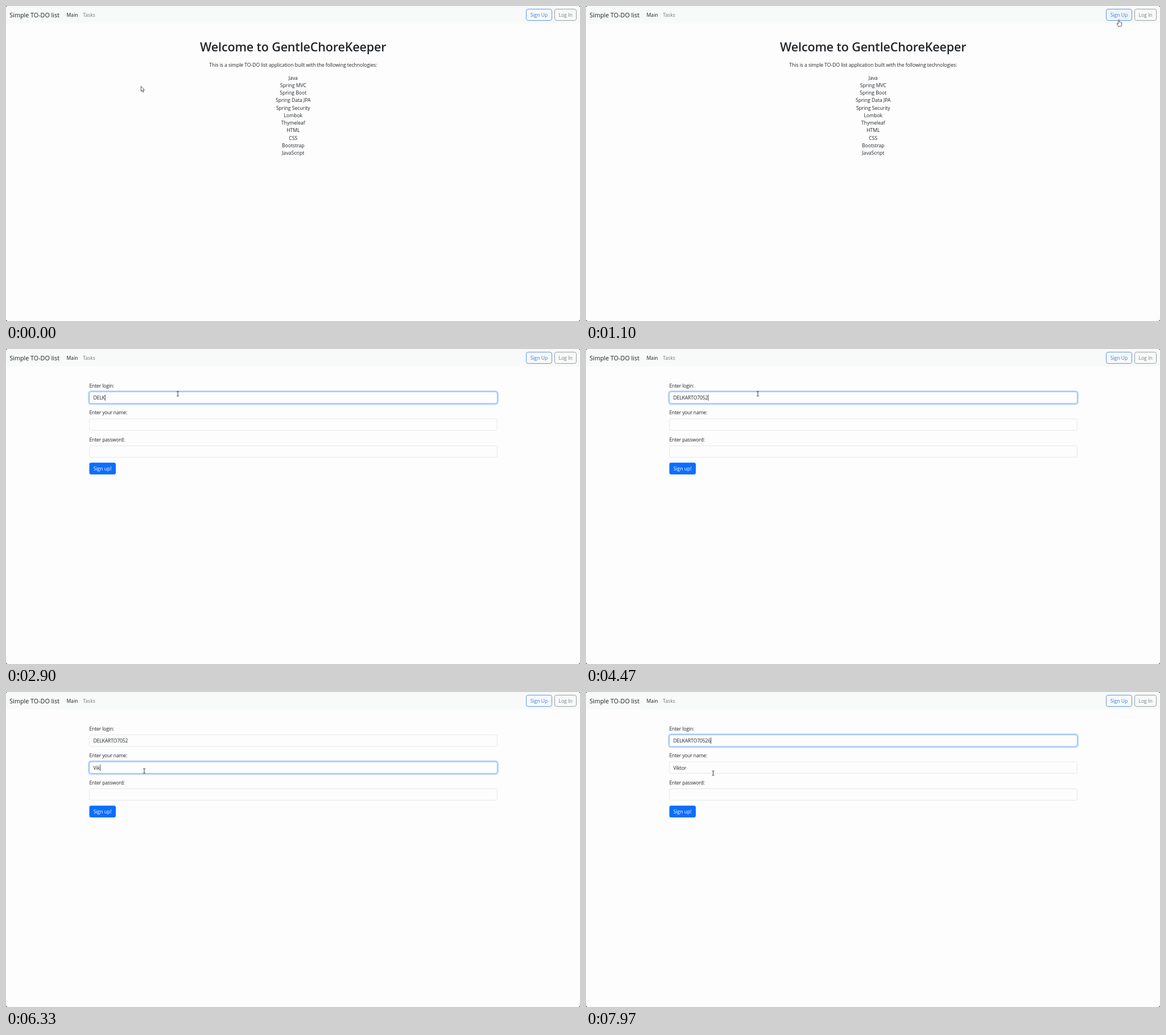
Animation, 1009 px wide and 555 px high, one loop 8000 ms. Source, as an HTML page:

```html
<!DOCTYPE html>
<html lang="en">
<head>
<meta charset="utf-8">
<title>Simple TO-DO list</title>
<style>
  html, body { margin: 0; width: 100%; height: 100%; overflow: hidden; background: #2b2b2b; }
  svg { display: block; width: 1009px; height: 555px; }
  text { font: 8.6px "Open Sans", "Noto Sans", sans-serif; fill: #212529; white-space: pre; }
  .brand { font-size: 10.75px; fill: #1a1d20; }
  .title { font-size: 21.5px; font-weight: 600; letter-spacing: -.15px; }
  .intro { letter-spacing: -.05px; }
  .label { letter-spacing: -.17px; }
  .value { letter-spacing: -.12px; }
  .mid { text-anchor: middle; }
</style>
</head>
<body>
<svg id="stage" viewBox="0 0 1009 555" xmlns="http://www.w3.org/2000/svg"></svg>
<script>
const LOOP = 8000, FADE = 150, BLINK = 530;
const PAGE_SWITCH = 1500, HOVER = 1085;
const SIGN_UP = { x: 914.5, y: 5.5, w: 45, h: 20 };
const LOG_IN = { x: 964.5, y: 5.5, w: 38, h: 20 };
const FIELD = { x: 146.5, w: 717, h: 20.4 };

const stage = document.getElementById('stage');

function add(parent, tag, attrs = {}, content) {
  const el = document.createElementNS('http://www.w3.org/2000/svg', tag);
  for (const key in attrs) el.setAttribute(key, attrs[key]);
  if (content !== undefined) el.textContent = content;
  parent.append(el);
  return el;
}
const label = (parent, x, y, str, cls = '', fill) =>
  add(parent, 'text', { x, y, class: cls, ...(fill && { style: `fill:${fill}` }) }, str);
const box = (parent, { x, y, w, h }, attrs) =>
  add(parent, 'rect', { x, y, width: w, height: h, rx: 3.3, ...attrs });

// Window and navigation bar
add(stage, 'rect', { width: 1009, height: 555, rx: 3.5, fill: '#fdfdfd' });
add(stage, 'path', { d: 'M0 31V3.5Q0 0 3.5 0H1005.5Q1009 0 1009 3.5V31Z', fill: '#f8f9f9' });
label(stage, 6.3, 20, 'Simple TO-DO list', 'brand');
label(stage, 106.6, 19, 'Main', '', '#16191c');
label(stage, 135.2, 19, 'Tasks', '', '#74777a');
box(stage, SIGN_UP, { fill: 'none', stroke: '#5a97ea' });
label(stage, 937, 19, 'Sign Up', 'mid', '#2f7cf2');
box(stage, LOG_IN, { fill: 'none', stroke: '#9a9f9f' });
label(stage, 983.6, 19, 'Log In', 'mid', '#767e85');

const hover = add(stage, 'g');
box(hover, SIGN_UP, { fill: '#0d6efd', stroke: '#0d6efd' });
label(hover, 937, 19, 'Sign Up', 'mid', '#fff');

// Welcome page
const welcome = add(stage, 'g');
label(welcome, 504.7, 80, 'Welcome to GentleChoreKeeper', 'title mid');
label(welcome, 504.8, 107.4, 'This is a simple TO-DO list application built with the following technologies:', 'intro mid');
['Java', 'Spring MVC', 'Spring Boot', 'Spring Data JPA', 'Spring Security', 'Lombok',
 'Thymeleaf', 'HTML', 'CSS', 'Bootstrap', 'JavaScript']
  .forEach((name, i) => label(welcome, 504.8, 129.6 + i * 13.27, name, 'mid'));

// Sign-up form
const form = add(stage, 'g');

function makeField(top, caption) {
  const area = { ...FIELD, y: top };
  label(form, 146.5, top - 7.7, caption, 'label');
  box(form, area, { fill: '#fdfdfd', stroke: '#dfe3e8', 'stroke-width': .8 });
  const focus = add(form, 'g', { opacity: 0 });
  box(focus, { x: area.x - 1.4, y: top - 1.4, w: area.w + 2.8, h: area.h + 2.8 },
    { rx: 4.5, fill: 'none', stroke: '#0d6efd', 'stroke-opacity': .27, 'stroke-width': 2.2 });
  box(focus, area, { fill: 'none', stroke: '#86b7fe', 'stroke-width': .9 });
  const text = label(form, 153.4, top + 13.8, '', 'value');
  const caret = add(form, 'rect', { y: top + 4.8, width: .8, height: 11, fill: '#212529' });
  return { top, focus, text, caret };
}

const login = makeField(75.5, 'Enter login:');
const person = makeField(123, 'Enter your name:');
const password = makeField(170.5, 'Enter password:');
const fields = [login, person, password];

Object.assign(login, {
  value: 'DELKARTO70526',
  keys: [2600, 2700, 2800, 2900, 3230, 3370, 3530, 3630, 3830, 4000, 4270, 4470, 7730],
  spans: [[2000, 5140], [7270, LOOP + FADE]]
});
Object.assign(person, {
  value: 'Viktor',
  keys: [6000, 6130, 6330, 6400, 6530, 6630],
  spans: [[5140, 7270]]
});
Object.assign(password, { value: '', keys: [], spans: [] });

box(form, { x: 146.5, y: 200.2, w: 46.5, h: 20.8 }, { fill: '#0d6efd' });
label(form, 169.7, 214, 'Sign up!', 'mid', '#fff');

// Pointers, drawn around their hot spot
const ink = { fill: '#fff', stroke: '#2c2c34', 'stroke-width': .8, 'stroke-linejoin': 'round' };
const pointer = add(stage, 'g');
const shapes = {
  arrow: add(pointer, 'path', { ...ink, d: 'M.4 .4V9.3L2.4 7.5 3.8 10.7 5.3 10 3.9 6.9H6.4Z' }),
  hand: add(pointer, 'path', { ...ink,
    d: 'M-.9 7.2V1Q-.9 0 0 0T.9 1V4Q1.8 3.4 2.4 4.2 3.3 3.6 3.9 4.6 5.2 4.2 5.2 5.6V8Q5.2 9.6 4.2 11.6H-.6Q-1.4 9.8-3.2 7.6-3.6 6.4-2.3 6.2Z' }),
  beam: add(pointer, 'path', { fill: 'none', stroke: '#2c2c34', 'stroke-width': .9,
    d: 'M-2-4H-.6Q0-4 0-3.4 0-4 .6-4H2M0-3.4V3.4M-2 4H-.6Q0 4 0 3.4 0 4 .6 4H2' })
};

const clamp = u => Math.min(1, Math.max(0, u));
const smooth = u => u * u * (3 - 2 * u);
const linear = u => u;
const easeIn = u => u * u;
const easeOut = u => 1 - (1 - u) * (1 - u);

// time, x, y, easing on the way there
const path = [
  [30, 237, 141],
  [830, 981, 87, smooth],
  [1090, 936.5, 25, linear],
  [1330, 937, 17, easeOut],
  [1500, 937, 17, linear],
  [1670, 434, 81, easeIn],
  [1960, 302, 79, easeOut],
  [4730, 302, 79, linear],
  [5110, 242, 140, smooth],
  [5200, 242, 140, linear],
  [5300, 243, 139, linear],
  [6930, 243, 139, linear],
  [7250, 229, 87, smooth],
  [7730, 229, 87, linear],
  [7970, 223.5, 143, smooth]
];

function pointerAt(t) {
  const i = path.findIndex(p => p[0] > t);
  if (i === 0) return path[0].slice(1, 3);
  if (i < 0) return path[path.length - 1].slice(1, 3);
  const [t0, x0, y0] = path[i - 1], [t1, x1, y1, ease] = path[i];
  const u = ease((t - t0) / (t1 - t0));
  return [x0 + (x1 - x0) * u, y0 + (y1 - y0) * u];
}

const inside = (x, y, r) => x >= r.x && x <= r.x + r.w && y >= r.y && y <= r.y + r.h + .5;

function pointerKind(x, y, onForm) {
  if (inside(x, y, SIGN_UP)) return 'hand';
  return onForm && fields.some(f => inside(x, y, { ...FIELD, y: f.top })) ? 'beam' : 'arrow';
}

function drawField(field, t) {
  const count = field.keys.filter(k => k <= t).length;
  field.text.textContent = field.value.slice(0, count);
  const glow = field.spans.reduce((sum, [from, to]) =>
    sum + smooth(clamp((t - from) / FADE)) - smooth(clamp((t - to) / FADE)), 0);
  field.focus.setAttribute('opacity', glow);

  const span = field.spans.find(([from, to]) => t >= from && t < to);
  const since = span ? t - Math.max(span[0], count ? field.keys[count - 1] : 0) : 0;
  const shown = span && Math.floor(since / BLINK) % 2 === 0;
  field.caret.setAttribute('opacity', shown ? 1 : 0);
  if (shown) field.caret.setAttribute('x', 153.5 + (count ? field.text.getComputedTextLength() : 0));
}

function draw(t) {
  const onForm = t >= PAGE_SWITCH;
  welcome.style.display = onForm ? 'none' : '';
  form.style.display = onForm ? '' : 'none';
  hover.setAttribute('opacity', onForm ? 0 : smooth(clamp((t - HOVER) / FADE)));
  if (onForm) fields.forEach(f => drawField(f, t));

  const [x, y] = pointerAt(t);
  const kind = pointerKind(x, y, onForm);
  pointer.setAttribute('transform', `translate(${x} ${y})`);
  for (const name in shapes) shapes[name].style.display = name === kind ? '' : 'none';
}

const start = performance.now();
function tick() {
  draw((performance.now() - start) % LOOP);
  requestAnimationFrame(tick);
}
tick();
</script>
</body>
</html>
```
